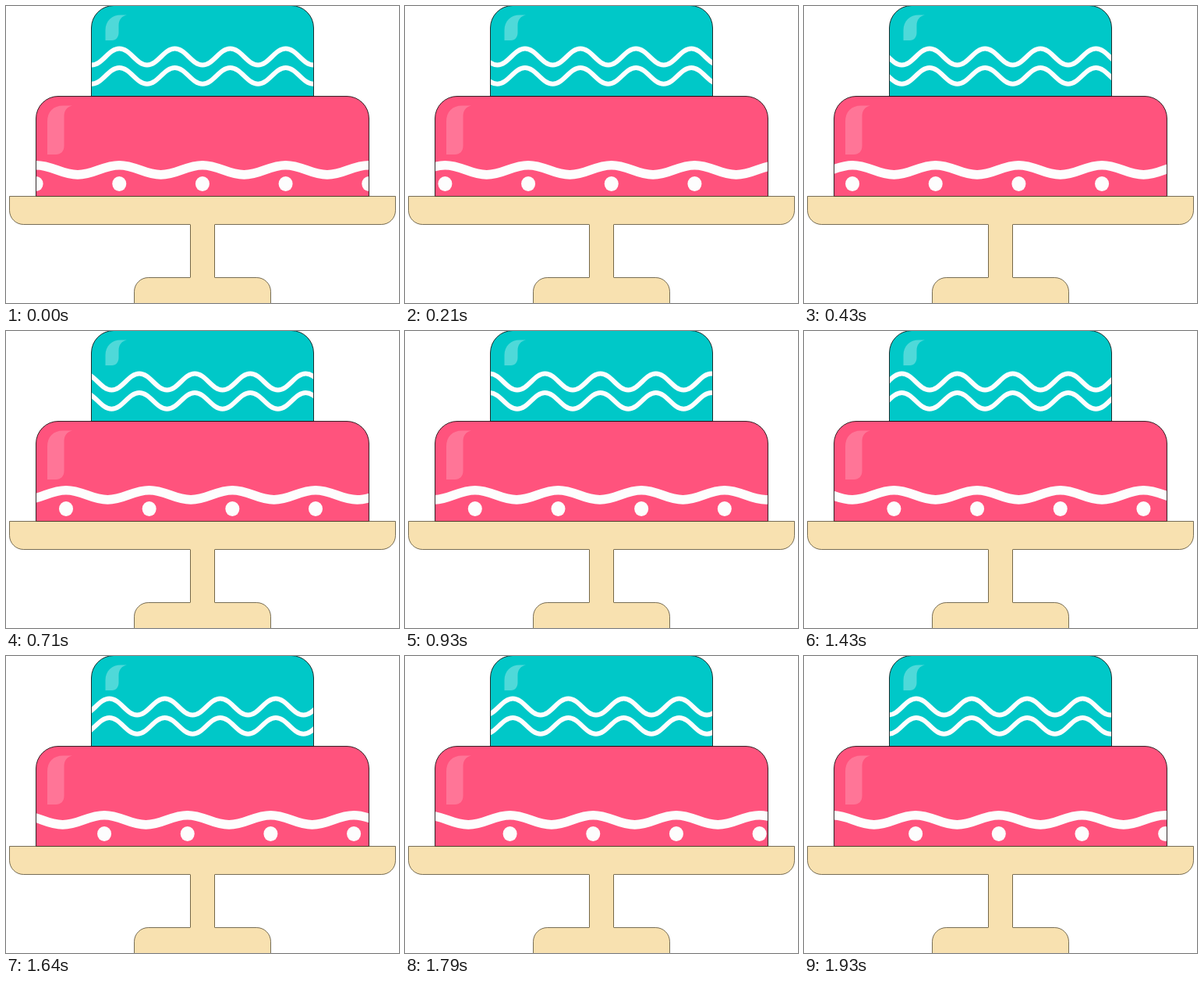
These frames come from a looping animation (504 by 380 pixels, 2000 ms). An HTML page with a canvas:

```html
<!DOCTYPE html>
<html lang="en">
<head>
<meta charset="utf-8">
<title>Cake</title>
<style>
html, body { margin: 0; width: 100%; height: 100%; overflow: hidden; background: #fff; }
canvas { display: block; }
</style>
</head>
<body>
<canvas id="stage" width="504" height="380"></canvas>
<script>
const ctx = document.getElementById('stage').getContext('2d');
const LOOP = 2000, SHOWN = 28, STEPS = 50;
const TEAL = '#00c8c8', PINK = '#ff537d', CREAM = '#f8e1b0', ICING = '#fdfdfd';
const LINE = 'rgba(0,0,0,.8)', SOFT_LINE = 'rgba(30,22,0,.6)';

// Shown pictures fall on 10 ms ticks; each one takes the next 40 ms step of the slide.
function progress(ms) {
  const t = ms % LOOP;
  const tick = k => Math.round(k * LOOP / SHOWN / 10) * 10;
  let k = SHOWN - 1;
  while (k > 0 && tick(k) > t) k--;
  return Math.ceil(tick(k) / (LOOP / STEPS)) / STEPS;
}

function box(x, y, w, h, radii) {
  const p = new Path2D();
  p.roundRect(x, y, w, h, radii);
  return p;
}

function paint(path, fill, line) {
  ctx.fillStyle = fill;
  ctx.fill(path);
  if (!line) return;
  ctx.strokeStyle = line;
  ctx.lineWidth = 1;
  ctx.stroke(path);
}

// A crest sits at x = crest; the curve repeats every period.
function wave(crest, y, amp, period, width) {
  const half = period / 2, pull = half * 0.39;
  let x = crest - 2 * period, side = -1;
  ctx.beginPath();
  ctx.moveTo(x, y - amp);
  while (x < 520) {
    ctx.bezierCurveTo(x + pull, y + side * amp, x + half - pull, y - side * amp, x + half, y - side * amp);
    x += half;
    side = -side;
  }
  ctx.strokeStyle = ICING;
  ctx.lineWidth = width;
  ctx.stroke();
}

function tier(path, fill, decorate) {
  paint(path, fill);
  ctx.save();
  ctx.clip(path);
  decorate();
  ctx.restore();
  paint(path, 'transparent', LINE);
}

const top_ = box(109.5, -0.5, 285, 116, [28.5, 28.5, 0, 0]);
const bottom = box(38.5, 115.5, 427, 128, [28.5, 28.5, 0, 0]);
const plate = box(4.5, 243.5, 495, 36, [0, 0, 18, 18]);
const base = box(164.5, 347.5, 175, 50, [18, 18, 0, 0]);
const stem = new Path2D('M236.5 279.5V347.5M267.5 279.5V347.5');
const shineTop = new Path2D('M127.5 44V31C127.5 19 136 11.5 147 11.5H155C148 13 144.5 18 144.5 25V34C144.5 40 141 44 136 44Z');
const shineBottom = new Path2D('M53 190V148C53 135 61 127.5 73 127.5H85C78 129 74.5 134 74.5 141V179C74.5 186 70 190 64 190Z');

function draw(p) {
  ctx.fillStyle = '#fff';
  ctx.fillRect(0, 0, 504, 380);

  tier(top_, TEAL, () => {
    const period = 71.11, crest = 145.4 + p * period;
    wave(crest, 65, 10.4, period, 6);
    wave(crest, 89.4, 10.4, period, 6);
    paint(shineTop, 'rgba(255,255,255,.31)');
  });

  tier(bottom, PINK, () => {
    const period = 106.67, first = 38.6 + p * period;
    wave(first, 209.8, 6.1, period, 11.6);
    ctx.fillStyle = ICING;
    for (let i = 0; i < 5; i++) {
      ctx.beginPath();
      ctx.ellipse(first + i * period, 227.5, 9, 9.4, 0, 0, 2 * Math.PI);
      ctx.fill();
    }
    paint(shineBottom, 'rgba(255,255,255,.2)');
  });

  paint(plate, CREAM, SOFT_LINE);
  paint(base, CREAM, SOFT_LINE);
  ctx.fillStyle = CREAM;
  ctx.fillRect(236, 279, 32, 70);
  paint(stem, 'transparent', SOFT_LINE);
}

function frame() {
  draw(progress(performance.now()));
  requestAnimationFrame(frame);
}
frame();
</script>
</body>
</html>
```
